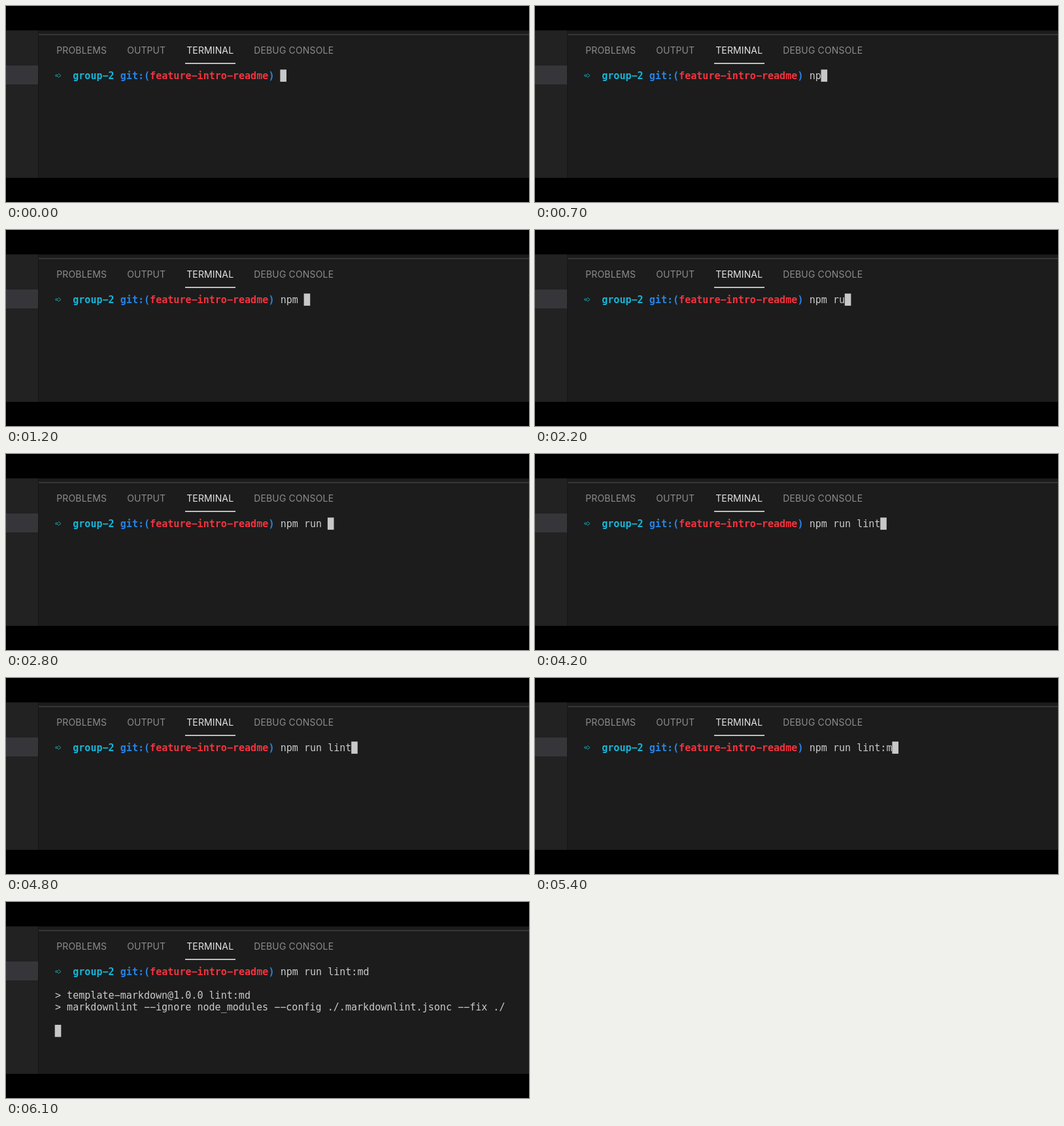
Write an HTML page with a canvas that moves like this. It is 800 px wide and 300 px high and loops after 7100 ms.

```html
<!DOCTYPE html>
<html lang="en">
<head>
<meta charset="utf-8">
<title>Terminal lint run</title>
<style>
  html, body { margin: 0; width: 100%; height: 100%; overflow: hidden; background: #000; }
  canvas { display: block; }
</style>
</head>
<body>
<canvas id="stage" width="800" height="300"></canvas>
<script>
const ctx = document.getElementById("stage").getContext("2d");
const LOOP = 7100;
const CELL = 9.07, LINE = 18.13, LEFT = 75, BASE = 112;
const MONO = '15.065px "DejaVu Sans Mono", monospace';
const SANS = '14px Inter, sans-serif';
const TEXT = "#cacaca";

const COMMAND = "npm run lint:md";
// time at which each character of the command appears
const KEYS = [400, 700, 1000, 1200, 1500, 1900, 2300, 2700, 3100, 3400, 3700, 3900, 5000, 5300, 5500];
const ENTER = 5800, OUTPUT = 6000;

const TABS = [["PROBLEMS", 78, 77], ["OUTPUT", 186, 59], ["TERMINAL", 277, 72], ["DEBUG CONSOLE", 380, 122]];
const PROMPT = [
  [3, "group-2", "#16b4d6"],
  [11, "git:(", "#2584e6"],
  [16, "feature-intro-readme", "#f2333f"],
  [36, ")", "#2584e6"]
];
const LOG = [
  "> template-markdown@1.0.0 lint:md",
  "> markdownlint --ignore node_modules --config ./.markdownlint.jsonc --fix ./"
];

function rect(x, y, w, h, color) {
  ctx.fillStyle = color;
  ctx.fillRect(x, y, w, h);
}

// terminal text; hyphens are drawn as wide dashes
function type(col, row, text, color = TEXT, bold = false) {
  ctx.font = (bold ? "bold " : "") + MONO;
  ctx.fillStyle = color;
  ctx.fillText(text.replace(/-/g, "\u2212"), LEFT + col * CELL, BASE + row * LINE);
}

function cursor(col, row) {
  rect(LEFT + col * CELL - 0.3, BASE + row * LINE - 14.7, 9.6, 18.6, "#c8c8c8");
}

function drawFrame() {
  rect(0, 0, 800, 300, "#000");
  rect(0, 37.5, 800, 225.5, "#1c1c1c");
  rect(0, 37.5, 49, 225.5, "#222222");
  rect(0, 91, 49, 29, "#35353a");
  rect(49, 37.5, 1, 225.5, "#171717");
  rect(50, 43, 750, 1.4, "#414141");
}

function drawTabs() {
  ctx.font = SANS;
  for (const [label, x, width] of TABS) {
    const active = label === "TERMINAL";
    ctx.letterSpacing = "0px";
    const gap = (width - ctx.measureText(label).width) / label.length;
    ctx.letterSpacing = Math.max(-0.3, Math.min(0.3, gap)) + "px";
    ctx.fillStyle = active ? "#e4e4e4" : "#8c8c8c";
    ctx.fillText(label, x - 0.8, 73);
  }
  ctx.letterSpacing = "0px";
  rect(274, 87, 77, 1.6, "#e4e4e4");
}

function drawPrompt() {
  ctx.strokeStyle = "#159fa6";
  ctx.lineWidth = 1;
  ctx.beginPath();
  ctx.moveTo(80, 105.4);
  ctx.lineTo(76, 105.4);
  ctx.lineTo(76, 107.6);
  ctx.lineTo(80, 107.6);
  ctx.moveTo(80, 103.3);
  ctx.lineTo(84, 106.5);
  ctx.lineTo(80, 109.7);
  ctx.stroke();
  for (const [col, text, color] of PROMPT) type(col, 0, text, color, true);
}

function draw(t) {
  drawFrame();
  drawTabs();
  drawPrompt();
  const typed = KEYS.filter(k => k <= t).length;
  type(38, 0, COMMAND.slice(0, typed));
  if (t < ENTER) {
    cursor(38 + typed, 0);
  } else if (t < OUTPUT) {
    cursor(0, 1);
  } else {
    LOG.forEach((text, i) => type(0, 2 + i, text));
    cursor(0, 5);
  }
}

const start = performance.now();
function tick() {
  draw((performance.now() - start) % LOOP);
  requestAnimationFrame(tick);
}
tick();
</script>
</body>
</html>
```
